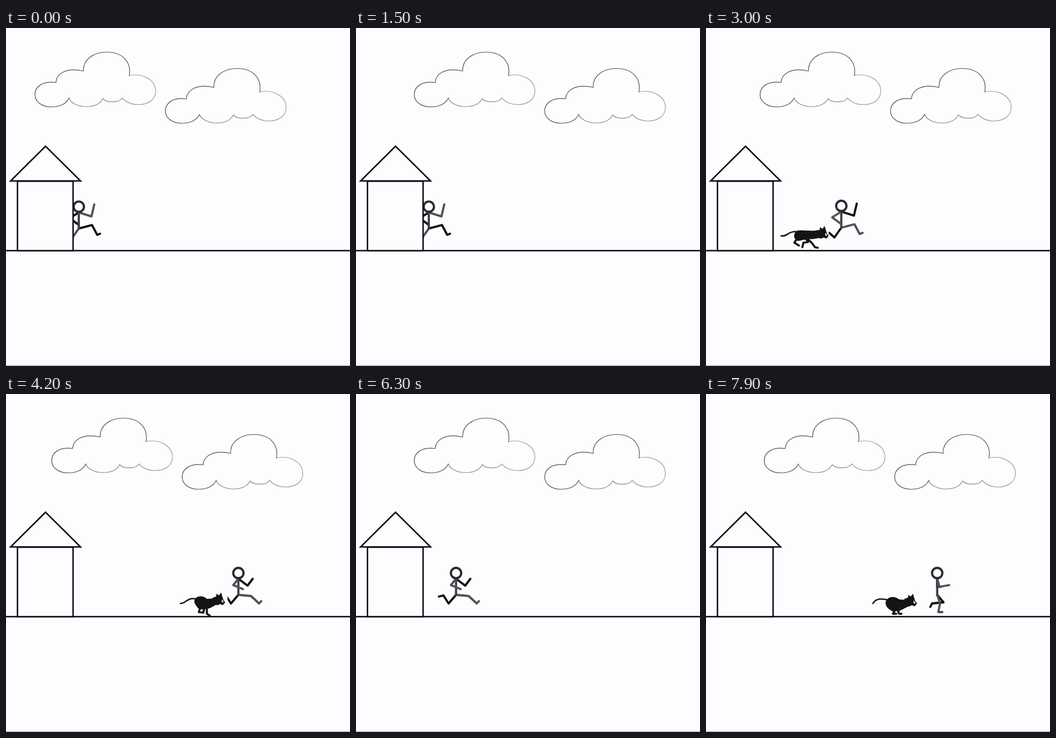
An HTML page that plays this animation: 600x589 px, repeating every 8 s.

```html
<!DOCTYPE html>
<html lang="en">
<head>
<meta charset="utf-8">
<title>Cat chase</title>
<style>
  html, body { margin: 0; width: 100%; height: 100%; overflow: hidden; background: #fdfcfe; }
  svg { display: block; width: 100%; height: 100%; }
  .line { fill: none; stroke-linecap: round; stroke-linejoin: round; }
</style>
</head>
<body>
<svg viewBox="0 0 600 589">
  <defs>
    <g id="cloud" class="line" stroke-width="1.2">
      <path stroke="#a2a0a4" d="M215 83C238 78 261 90 261 110C261 127 245 133.5 231 133.5C217 133.5 209 129 203 122"/>
      <path stroke="#8c8a8e" d="M203 122C198 130.500 176 131 169 123C164 133 154 137 140 137C125 137 112 130 110 122"/>
      <path stroke="#555358" d="M110 122C104 134 92 137.500 79 137.500C62 137.500 50.500 128 50.500 116C50.500 102 64 92 87 95C88 80 104 68 135 75C134 55 152 42 176 42C204 42 219 60 215 83"/>
    </g>
    <g id="catHead">
      <path fill="#141416" d="M-11 -4L-5 -6L-4 -11L0 -8L4 -13L6 -6L8 0L11 4L7 9L2 7L-2 9L-11 7Z"/>
      <path fill="#fff" d="M5 -1L8 2L7 5L5 3Z"/>
    </g>
  </defs>

  <rect width="600" height="589" fill="#fdfcfe"/>
  <g id="clouds">
    <use href="#cloud"/>
    <use href="#cloud" x="227.500" y="28.500"/>
  </g>
  <path d="M0 388H600" stroke="#0c0a10" stroke-width="2.600"/>
  <path d="M0 588.500H600" stroke="#99979b"/>

  <g id="runner" class="line" stroke-width="3.800"></g>

  <g id="cat">
    <rect y="-1" width="86" height="47" fill="#fefdfe"/>
    <path id="catTail" class="line" stroke="#1c1c1e" stroke-width="2.500"/>
    <path id="catLegs" class="line" stroke="#141416" stroke-width="3.600"/>
    <path id="catBody" fill="#141416"/>
    <use id="catFace" href="#catHead"/>
  </g>

  <g fill="#fdfcfe" stroke="#0c0a10" stroke-width="2.500">
    <rect x="20" y="267" width="97" height="121"/>
    <path d="M69 206L8 266.500H130Z"/>
  </g>
</svg>
<script>
const STEP = 100, STEPS = 80, SPEED = 14.36;
const BLACK = '#121114', GREY = '#525155';
const byId = id => document.getElementById(id);
const lerp = (a, b, k) => a + (b - a) * k;

function addShape(parent, tag, attrs) {
  const el = document.createElementNS('http://www.w3.org/2000/svg', tag);
  for (const key in attrs) el.setAttribute(key, attrs[key]);
  return parent.appendChild(el);
}

// Each pose: shift x, head y, then leading arm, trailing arm, leading leg, trailing leg.
const reach  = [0, 310,  22, 17, 27, -4,  -16, 20, -1, 31,  23, 32, 32, 49, 37, 47,  -12, 55, -21, 47, -29, 48];
const stride = [-3, 312, 16, 22, 25, 10,  -9, 21, 8, 28,    22, 40, 36, 53, 40, 49,  -13, 53, -22, 39, -30, 41];
const pass   = [-4, 312, 0, 24, 6, 24,    4, 24, 21, 21,    5, 53, 2, 68, 9, 68,     11, 51, -9, 53, -12, 59];
const swapSides = p => [...p.slice(0, 2), ...p.slice(6, 10), ...p.slice(2, 6), ...p.slice(16), ...p.slice(10, 16)];
const halfStride = [[0, reach], [0.09, stride], [0.25, pass], [0.5, swapSides(reach)]];

// Step number and stride phase; linear in between.
const phaseKeys = [[0, 0.5], [22, 0.5], [30, 1], [42, 2.09], [52, 3], [63, 4.09], [79, 5.25]];

function segment(keys, at) {
  let i = 0;
  while (i < keys.length - 2 && at >= keys[i + 1][0]) i++;
  const [a, b] = [keys[i], keys[i + 1]];
  return [a[1], b[1], (at - a[0]) / (b[0] - a[0])];
}

function runnerPose(phase) {
  const turn = phase - Math.floor(phase + 1e-6);
  const second = turn >= 0.5;
  const [a, b, k] = segment(halfStride, second ? turn - 0.5 : Math.max(0, turn));
  const pose = a.map((v, i) => lerp(v, b[i], k));
  return second ? swapSides(pose) : pose;
}

const runner = byId('runner');
const limb = color => addShape(runner, 'path', { stroke: color });
const frontArm = limb(BLACK), backLeg = limb(BLACK), frontLeg = limb(GREY);
addShape(runner, 'path', { d: 'M0 9V38', stroke: '#3e3d41' });
const backArm = limb(GREY);
addShape(runner, 'circle', { r: 9, stroke: '#2a292d' });

function drawRunner(n) {
  const waiting = n <= 22;
  const [a, b, k] = segment(phaseKeys, n);
  const pose = runnerPose(lerp(a, b, k));
  const x = waiting ? 127 : n < 58 ? 236 + SPEED * (n - 30) : 177.5 + SPEED * (n - 63);
  const y = pose[1] + (waiting ? 1.4 : 0);
  runner.setAttribute('transform', `translate(${x + pose[0]} ${y})`);
  const bend = (el, startY, from, to) => el.setAttribute('d', `M0 ${startY}L${pose.slice(from, to).join(' ')}`);
  bend(frontArm, 10, 2, 6);
  bend(backArm, 10, 6, 10);
  bend(frontLeg, 38, 10, 16);
  bend(backLeg, 38, 16, 22);
}

const trot = {
  tail: 'M3 22C13 25 16 13 30 15',
  body: 'M26 20C28 10 38 13 48 13S60 14 68 12L74 24C68 27 62 27 56 28C46 27 38 31 32 31C27 29 25 25 26 20Z',
  legs: 'M31 27L26 34L34 39M46 27L50 33L42 34L40 42M50 28L57 35L62 42L67 43',
  head: [75, 18]
};
const plant = {
  tail: 'M4 25C12 26 16 14 30 17',
  body: 'M28 22C29 11 43 10 50 17L66 16L70 26C62 28 58 34 50 34C44 37 32 36 28 22Z',
  legs: 'M35 31L38 34L36 40L44 41M46 31L44 40M50 32L50 43L55 46',
  head: [71, 19]
};
const leap = {
  tail: 'M3 32L10 31C15 29 16 23 24 23',
  body: 'M18 25C24 18 38 21 46 20L62 16L68 25C60 30 56 34 48 33C38 32 30 35 22 33Z',
  legs: 'M23 27L18 32L9 37L10 43M48 31L57 37L59 42L63 44M52 31L60 35L67 38',
  head: [68, 18]
};
const gather = {
  tail: 'M4 25C10 16 18 16 31 19',
  body: 'M26 24C28 12 42 11 50 18L66 19L70 29C62 31 58 35 52 37C44 40 28 39 26 24Z',
  legs: 'M37 36L42 38L39 43L45 43M51 35L48 39L50 43L54 43',
  head: [70, 21]
};
const gallop = [trot, gather, gather, plant, plant, leap, leap, trot];

function drawCat(n) {
  const firstRun = n >= 26 && n <= 62, secondRun = n >= 64;
  byId('cat').style.display = firstRun || secondRun ? '' : 'none';
  if (!firstRun && !secondRun) return;
  const x = firstRun ? 128 + SPEED * (n - 30) : 287 + SPEED * (n - 79);
  const pose = gallop[(n + 2) % 8];
  byId('cat').setAttribute('transform', `translate(${x} 340)`);
  byId('catTail').setAttribute('d', pose.tail);
  byId('catBody').setAttribute('d', pose.body);
  byId('catLegs').setAttribute('d', pose.legs);
  byId('catFace').setAttribute('transform', `translate(${pose.head})`);
}

function drawClouds(n) {
  const drift = 12 - Math.abs((n + 1) % 24 - 12);
  byId('clouds').setAttribute('transform', `translate(${7.3 * (drift - 1)} 0)`);
}

function render(ms) {
  const n = Math.floor(ms / STEP) % STEPS;
  drawClouds(n);
  drawRunner(n);
  drawCat(n);
}

const start = performance.now();
function tick() {
  render(performance.now() - start);
  requestAnimationFrame(tick);
}
tick();
</script>
</body>
</html>
```
